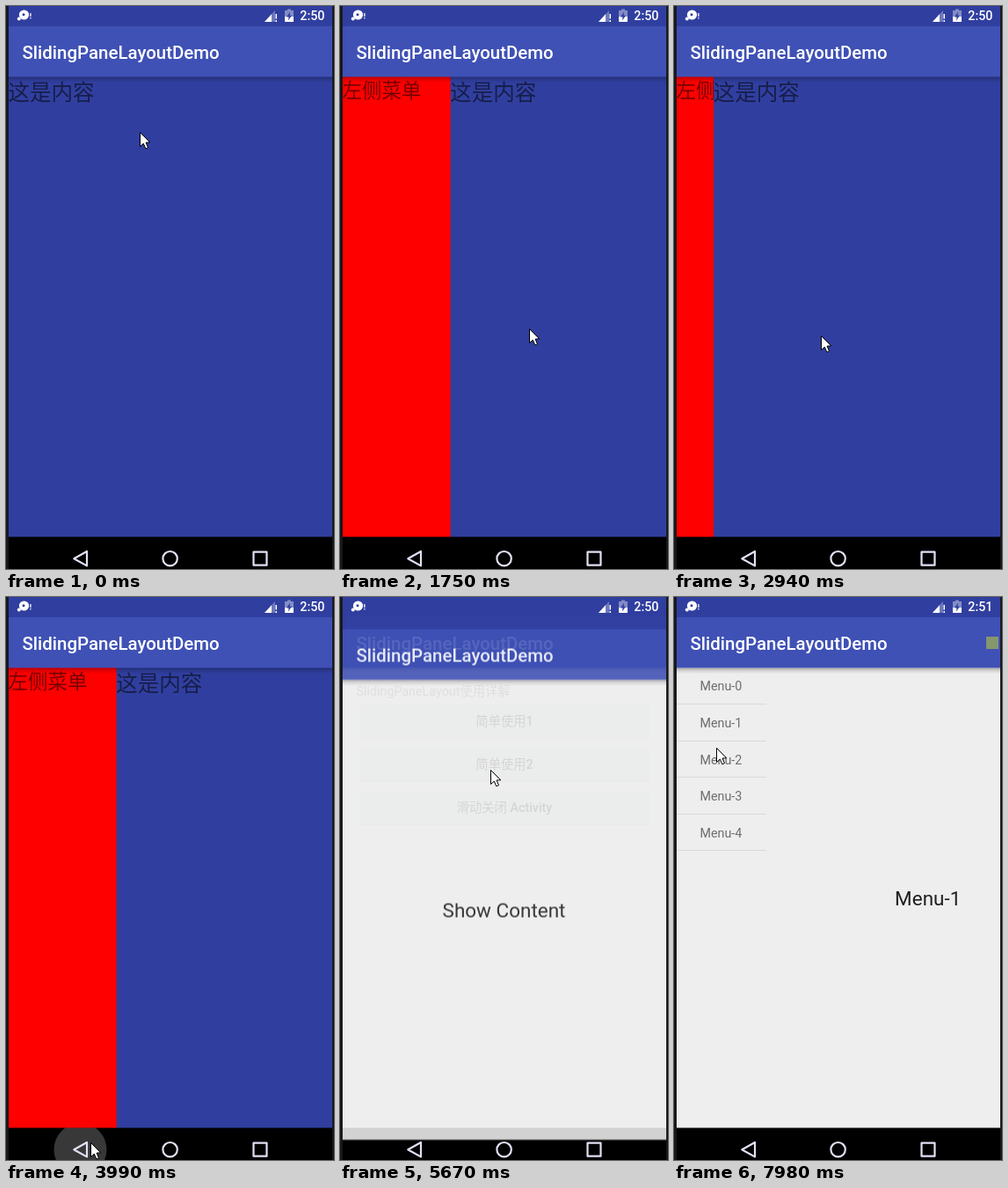
Recreate the animation shown at these times as an HTML page with a canvas. Size 373 by 639 pixels, loop 8 s.

```html
<!DOCTYPE html>
<html lang="zh-CN">
<head>
<meta charset="utf-8">
<title>SlidingPaneLayoutDemo</title>
<style>
html, body { margin: 0; width: 100%; height: 100%; overflow: hidden; background: #000; }
canvas { display: block; }
</style>
</head>
<body>
<canvas id="stage" width="373" height="639"></canvas>
<script>
const W = 373, H = 639, LOOP = 8000, STEP = 70;
const LEFT = 3, WIDTH = 368, BAR_TOP = 23, BODY_TOP = 80.4, NAV_TOP = 602.5;
const DP = 1.022; // stage pixels per Android dp
const INDIGO = '#3f51b5', DARK_INDIGO = '#303f9f', PAPER = '#eeeeee';
const SECONDARY = 'rgba(0,0,0,.54)', PRIMARY = 'rgba(0,0,0,.87)';
const SANS = 'Roboto, "Noto Sans CJK SC", sans-serif';
const WINDOW_TRAVEL = 52.4; // windows slide by 8% of the screen height

// Moments at which something is tapped or opened
const BACK_TAP = 3990, CLOSE_FIRST = 4216, BUTTON_TAP = 5320;
const OPEN_SECOND = 5587, PANE_OPENED = 6790, ITEM_TAP = 7560;

const screen = document.getElementById('stage').getContext('2d');
const layerCanvas = document.createElement('canvas');
layerCanvas.width = W;
layerCanvas.height = H;
const layer = layerCanvas.getContext('2d');

const progress = (t, start, duration) => Math.max(0, Math.min(1, (t - start) / duration));

// A value that rests, then glides to each new target in turn
class Glider {
  constructor(t, ...value) {
    this.t = t;
    this.value = value;
  }
  to(start, end, ...target) {
    const p = progress(this.t, start, end - start);
    this.value = this.value.map((v, i) => v + (target[i] - v) * p);
    return this;
  }
}

const pointerAt = t => new Glider(t, 152, 143)
  .to(0, 770, 40, 350)
  .to(910, 1470, 203, 366)
  .to(1680, 1890, 240, 366)
  .to(1960, 2660, 117, 374)
  .to(2786, 3150, 236, 375)
  .to(3220, 3780, 96, 619)
  .to(4410, 5040, 171, 196)
  .to(5670, 6090, 178, 380)
  .to(6090, 6440, 288, 379)
  .to(6720, 7280, 48, 126)
  .to(7490, 7700, 32, 134)
  .to(7770, 7980, 48, 171).value;

const firstPaneAt = t => new Glider(t, 0)
  .to(937, 1360, 120 * DP)
  .to(2006, 2660, 0)
  .to(2830, 3150, 120 * DP).value[0];

const secondPaneAt = t => new Glider(t, 0).to(6115, 6440, 100 * DP).value[0];

function rect(c, color, x, y, w, h) {
  c.fillStyle = color;
  c.fillRect(x, y, w, h);
}

function disc(c, color, x, y, r) {
  c.fillStyle = color;
  c.beginPath();
  c.arc(x, y, r, 0, Math.PI * 2);
  c.fill();
}

function roundRect(c, color, x, y, w, h) {
  c.fillStyle = color;
  c.beginPath();
  c.roundRect(x, y, w, h, 2);
  c.fill();
}

function polygon(c, ...points) {
  c.beginPath();
  points.forEach(([x, y]) => c.lineTo(x, y));
  c.closePath();
}

function text(c, str, x, y, sp, color, weight = 400, align = 'left') {
  c.font = `${weight} ${sp * DP}px ${SANS}`;
  c.textAlign = align;
  c.fillStyle = color;
  c.fillText(str, x, y);
}

function clipped(c, x, y, w, h, draw) {
  c.save();
  c.beginPath();
  c.rect(x, y, w, h);
  c.clip();
  draw();
  c.restore();
}

function appWindow(c, background, drawBody) {
  rect(c, background, LEFT, 0, WIDTH, H);
  drawBody();
  const shadow = c.createLinearGradient(0, BODY_TOP, 0, BODY_TOP + 7);
  shadow.addColorStop(0, 'rgba(0,0,0,.32)');
  shadow.addColorStop(.4, 'rgba(0,0,0,.12)');
  shadow.addColorStop(1, 'rgba(0,0,0,0)');
  rect(c, shadow, LEFT, BODY_TOP, WIDTH, 7);
  rect(c, INDIGO, LEFT, 0, WIDTH, BODY_TOP);
  rect(c, DARK_INDIGO, LEFT, 0, WIDTH, BAR_TOP);
  rect(c, '#000', LEFT, NAV_TOP, WIDTH, H);
  text(c, 'SlidingPaneLayoutDemo', 18.5, 60, 20, '#fff', 500);
}

function firstDemo(c, t) {
  const offset = firstPaneAt(t);
  appWindow(c, '#ff0000', () => {
    text(c, '左侧菜单', LEFT - .5, 104, 22, SECONDARY);
    rect(c, DARK_INDIGO, LEFT + offset, 0, W, H);
    text(c, '这是内容', LEFT - .5 + offset, 106.5, 24, SECONDARY);
  });
}

function homeScreen(c, t) {
  appWindow(c, PAPER, () => {
    text(c, 'SlidingPaneLayout使用详解', 18.5, 112, 14, SECONDARY);
    ['简单使用1', '简单使用2', '滑动关闭 Activity'].forEach((label, i) => {
      const y = 122 + i * 49;
      roundRect(c, 'rgba(0,0,0,.16)', 22.5, y + 1, 329, 38);
      roundRect(c, '#d6d7d7', 23, y, 328, 38);
      if (i === 1 && t >= BUTTON_TAP) {
        const p = progress(t, BUTTON_TAP, 330);
        clipped(c, 23, y, 328, 38, () =>
          disc(c, `rgba(0,0,0,${.12 * (1 - p)})`, 171, 196, 20 + 200 * p));
      }
      text(c, label, 187, y + 24.3, 14, PRIMARY, 500, 'center');
    });
  });
}

function secondDemo(c, t) {
  const offset = secondPaneAt(t);
  appWindow(c, PAPER, () => {
    for (let i = 0; i < 5; i++) {
      const y = 80 + i * 41.6;
      text(c, 'Menu-' + i, 29.5, y + 26.3, 14, SECONDARY);
      rect(c, '#d9d9d9', LEFT, Math.round(y + 41), 102, 1);
    }
    rect(c, PAPER, LEFT + offset, 0, W, H);
    const message = t < ITEM_TAP ? 'Show Content' : 'Menu-1';
    text(c, message, 186.5 + offset, 350, 22, PRIMARY, 400, 'center');
  });
  if (t >= PANE_OPENED) rect(c, '#84976e', 355, 45, 14, 14);
}

function movingWindow(draw, t, shift, alpha) {
  layer.clearRect(0, 0, W, H);
  draw(layer, t);
  screen.globalAlpha = alpha;
  screen.drawImage(layerCanvas, 0, shift);
  screen.globalAlpha = 1;
}

function openWindow(draw, t, start) {
  const shift = WINDOW_TRAVEL * (1 - progress(t, start, 350)) ** 5;
  const alpha = 1 - (1 - progress(t, start, 200)) ** 4;
  movingWindow(draw, t, shift, alpha);
}

function closeWindow(draw, t, start) {
  const shift = WINDOW_TRAVEL * progress(t, start, 250) ** 4;
  movingWindow(draw, t, shift, 1 - progress(t, start + 100, 150));
}

function statusIcons(c, t) {
  disc(c, '#fff', 20.5, 10, 5.6);
  disc(c, '#fff', 14.8, 14.6, 2);
  disc(c, DARK_INDIGO, 20, 9.8, 1.5);
  rect(c, '#e8eaf6', 27.2, 8, 1.4, 4);
  rect(c, '#e8eaf6', 27.2, 13, 1.4, 1.4);

  const signal = (color, size) => {
    c.fillStyle = color;
    polygon(c, [294, 18], [294 + size, 18], [294 + size, 18 - size * 1.08]);
    c.fill();
  };
  signal('rgba(255,255,255,.3)', 12);
  signal('#fff', 8);
  rect(c, '#fff', 306.5, 9, 1.5, 5.5);
  rect(c, '#fff', 306.5, 16, 1.5, 2);

  rect(c, 'rgba(255,255,255,.4)', 317, 5, 10, 7);
  rect(c, 'rgba(255,255,255,.4)', 320, 3.5, 4, 1.5);
  rect(c, '#fff', 317, 12, 10, 6);
  polygon(c, [323, 6.5], [319, 12.5], [321.5, 12.5], [321, 16.5], [325, 10.8], [322.7, 10.8]);
  c.fillStyle = DARK_INDIGO;
  c.fill();

  text(c, t < ITEM_TAP ? '2:50' : '2:51', 362.5, 16, 14, '#fff', 500, 'right');
}

function navIcons(c, t) {
  const y = 627.2;
  if (t >= BACK_TAP) {
    const p = progress(t, BACK_TAP, 280);
    clipped(c, LEFT, NAV_TOP, WIDTH, H, () =>
      disc(c, `rgba(255,255,255,${.22 * (1 - p * p)})`, 84.5, y, 30 + 26 * p));
  }
  c.strokeStyle = '#e2e0f4';
  c.lineWidth = 2.2;
  c.lineJoin = 'round';
  polygon(c, [77.3, y], [92, y - 8.2], [92, y + 8.2]);
  c.stroke();
  c.beginPath();
  c.arc(186.6, y, 8.2, 0, Math.PI * 2);
  c.stroke();
  c.strokeRect(281.5, y - 7.5, 15, 15);
}

function pointer(c, [x, y]) {
  c.save();
  c.translate(x + .5, y + .5);
  polygon(c, [0, 0], [0, 16], [3.8, 12.6], [6.3, 18.3], [9, 17.2], [6.6, 11.5], [11.3, 11.3]);
  c.fillStyle = '#fff';
  c.fill();
  c.strokeStyle = '#000';
  c.lineWidth = 1;
  c.lineJoin = 'miter';
  c.stroke();
  c.restore();
}

function render(t) {
  const c = screen;
  rect(c, '#17181c', 0, 0, W, H);
  clipped(c, LEFT, 0, WIDTH, H, () => {
    homeScreen(c, t);
    if (t < CLOSE_FIRST) firstDemo(c, t);
    else if (t < BUTTON_TAP) closeWindow(firstDemo, t, CLOSE_FIRST);
    else openWindow(secondDemo, t, OPEN_SECOND);
    statusIcons(c, t);
    navIcons(c, t);
  });
  pointer(c, pointerAt(t).map(Math.round));
}

const began = performance.now();
function tick() {
  const t = (performance.now() - began) % LOOP;
  render(Math.floor(t / STEP) * STEP);
  requestAnimationFrame(tick);
}
tick();
</script>
</body>
</html>
```
